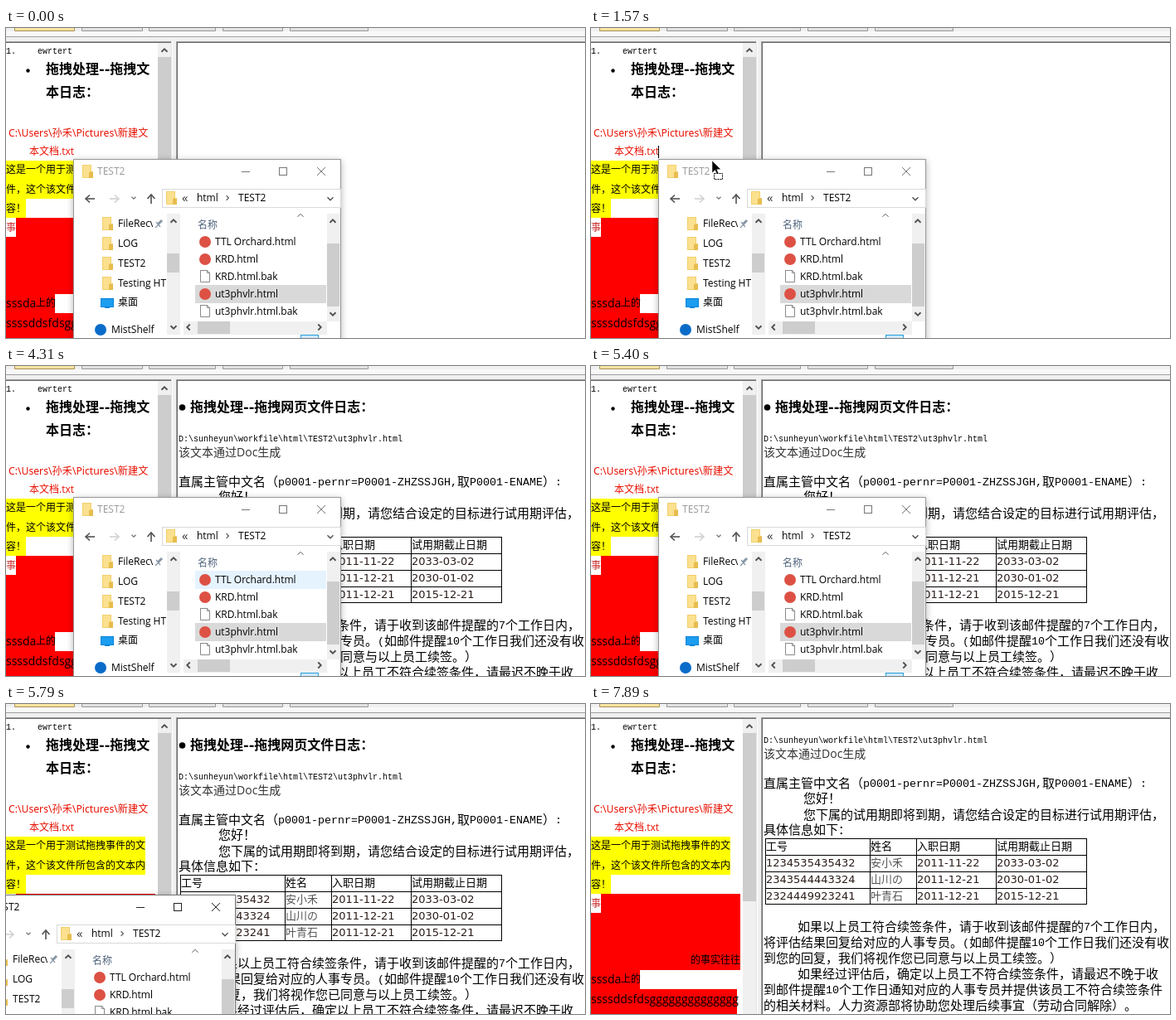
Recreate the animation shown at these times as an HTML page with a canvas. Size 698x374 px, loop 8000 ms.

```html
<!DOCTYPE html>
<html lang="zh-CN">
<head>
<meta charset="utf-8">
<style>
html, body { margin: 0; width: 100%; height: 100%; overflow: hidden; background: #fff; }
canvas { display: block; }
</style>
</head>
<body>
<canvas id="stage" width="698" height="374"></canvas>
<script>
const ctx = document.getElementById("stage").getContext("2d");
const LOOP = 8000;
const CJK = '"Noto Sans CJK SC", "Noto Sans CJK", sans-serif';
const UI = `"Open Sans", ${CJK}`;
const WIDE_UI = `"Noto Sans", ${CJK}`;
const CELL = `"DejaVu Sans", ${CJK}`;
const MONO = '"Liberation Mono", monospace';

function rect(x, y, w, h, fill) {
  ctx.fillStyle = fill;
  ctx.fillRect(x, y, w, h);
}

function frame(x, y, w, h, color) {
  ctx.strokeStyle = color;
  ctx.lineWidth = 1;
  ctx.strokeRect(x + 0.5, y + 0.5, w - 1, h - 1);
}

function line(color, width, ...points) {
  ctx.strokeStyle = color;
  ctx.lineWidth = width;
  ctx.beginPath();
  points.forEach(([x, y]) => ctx.lineTo(x, y));
  ctx.stroke();
}

function shape(fill, ...points) {
  ctx.fillStyle = fill;
  ctx.beginPath();
  points.forEach(([x, y]) => ctx.lineTo(x, y));
  ctx.closePath();
  ctx.fill();
}

function disc(x, y, r, fill) {
  ctx.fillStyle = fill;
  ctx.beginPath();
  ctx.arc(x, y, r, 0, Math.PI * 2);
  ctx.fill();
}

// y is the vertical middle of the line of text
function text(str, x, y, size = 12, family = UI, color = "#000", weight = "") {
  ctx.font = `${weight} ${size}px ${family}`;
  ctx.fillStyle = color;
  ctx.fillText(str, x, y + size * 0.37);
}

// Fixed-pitch text: full-width cells of 15px, Latin runs at 8px per letter
function gridText(str, x, y) {
  for (const run of str.match(/[ -~]+|[^ -~]/g)) {
    const latin = run < "\x7f";
    if (latin) text(run, x, y, 13.33, MONO);
    else text(run, x, y, 15, CJK);
    x += latin ? run.length * 8 : 15;
  }
}

function clipped(x, y, w, h, draw) {
  ctx.save();
  ctx.beginPath();
  ctx.rect(x, y, w, h);
  ctx.clip();
  draw();
  ctx.restore();
}

// dir: 0 up, 1 right, 2 down, 3 left
function chevron(x, y, dir, color = "#505050", r = 3.5, width = 1.8) {
  ctx.save();
  ctx.translate(x, y);
  ctx.rotate(dir * Math.PI / 2);
  line(color, width, [-r, r / 2], [0, -r / 2], [r, r / 2]);
  ctx.restore();
}

function arrow(x, y, dir, color) {
  ctx.save();
  ctx.translate(x, y);
  ctx.rotate(dir * Math.PI / 2);
  line(color, 1.6, [0, 6], [0, -5]);
  line(color, 1.6, [-4.5, 0], [0, -5], [4.5, 0]);
  ctx.restore();
}

function folder(x, y) {
  rect(x, y, 11, 16, "#f3cf6b");
  rect(x + 1, y + 1, 9, 14, "#fbe08f");
  shape("#e8bd4e", [x + 8, y + 9], [x + 13, y + 8], [x + 13, y + 16], [x + 8, y + 16]);
}

function page(x, y) {
  shape("#fff", [x, y], [x + 8, y], [x + 12, y + 4], [x + 12, y + 15], [x, y + 15]);
  line("#8a8a8a", 1, [x + .5, y + .5], [x + 8.5, y + .5], [x + 11.5, y + 3.5],
    [x + 11.5, y + 14.5], [x + .5, y + 14.5], [x + .5, y]);
  line("#8a8a8a", 1, [x + 8.5, y], [x + 8.5, y + 3.5], [x + 12, y + 3.5]);
}

// Held steps between keyed poses [time, x, y]
const STEP = 77.5;
function poseAt(keys, t) {
  const start = keys[0][0];
  const at = start + Math.floor((t - start) / STEP + 0.02) * STEP;
  let i = 0;
  while (i < keys.length - 2 && at >= keys[i + 1][0]) i++;
  const [t0, x0, y0] = keys[i], [t1, x1, y1] = keys[i + 1];
  const p = Math.max(0, Math.min(1, (at - t0) / (t1 - t0)));
  return [Math.round(x0 + (x1 - x0) * p), Math.round(y0 + (y1 - y0) * p)];
}

function drawToolbar() {
  rect(0, 0, 698, 374, "#f0f0f0");
  rect(0, 4, 698, 6, "#f8f8f8");
  [[10, 73], [91, 74], [172, 81], [261, 73], [342, 95]].forEach(([x, w], i) => {
    rect(x, 0, w, 4, i ? "#e1e1e1" : "#fbe3a1");
    line(i ? "#9a9a9a" : "#a8925a", 1, [x + .5, 0], [x + .5, 3.5], [x + w - .5, 3.5], [x + w - .5, 0]);
  });
  rect(0, 10, 698, 1, "#a0a0a0");
}

function drawLeft(caret) {
  rect(0, 16, 200, 358, "#fff");
  rect(0, 16, 200, 1, "#a0a0a0");
  rect(0, 17, 200, 1, "#696969");
  text("1.", 0, 27, 10, MONO);
  text("ewrtert", 38, 27, 10, MONO);
  disc(26.5, 51.5, 2.2, "#000");
  text("拖拽处理--拖拽文", 48, 49, 16, CELL, "#000", "bold");
  text("本日志：", 48, 77, 16, CELL, "#000", "bold");
  text("C:\\Users\\孙禾\\Pictures\\新建文", 3, 126, 12.2, WIDE_UI, "#e81000");
  text("本文档.txt", 28, 149, 12, UI, "#e81000");
  if (caret) rect(81, 142, 1, 15, "#000");

  rect(0, 160, 168, 46, "#ff0");
  rect(0, 206, 24, 23, "#ff0");
  text("这是一个用于测试拖拽事件的文", 0, 171, 12, CJK);
  text("件，这个该文件所包含的文本内", 0, 195, 12, CJK);
  text("容！", 0, 218, 12, CJK);

  rect(12, 229, 168, 23, "#f00");
  rect(0, 252, 180, 69, "#f00");
  rect(0, 321, 59, 23, "#f00");
  rect(0, 344, 176, 30, "#f00");
  text("事", 0, 241, 12, CJK, "#c33");
  text("的事实往往", 120, 309, 12, CJK);
  text("sssda", 0, 332, 14, UI);
  text("上的", 36, 332, 12, CJK);
  text("ssssddsfds" + "g".repeat(14), 0, 356, 14, UI);

  rect(183, 18, 16, 356, "#f0f0f0");
  rect(183, 35, 16, 203, "#cdcdcd");
  chevron(191, 27, 0);
  rect(199, 16, 1, 358, "#e3e3e3");
  rect(200, 16, 1, 358, "#fff");
}

function drawTable() {
  const cols = [210, 336, 392, 488, 597];
  const rows = [206, 226, 246, 266, 285];
  cols.forEach(x => rect(x, 206, 1, 80, "#000"));
  rows.forEach(y => rect(210, y, 388, 1, "#000"));
  const cells = [
    ["工号", "姓名", "入职日期", "试用期截止日期"],
    ["1234535435432", "安小禾", "2011-11-22", "2033-03-02"],
    ["2343544443324", "山川の", "2011-12-21", "2030-01-02"],
    ["2324449923241", "叶青石", "2011-12-21", "2015-12-21"]
  ];
  cells.forEach((row, r) => row.forEach((str, c) =>
    text(str, cols[c] + 1, rows[r] + 9, 13, CELL, r && c === 1 ? "#555" : r ? "#2b1d1a" : "#000")));
}

function drawDocument() {
  text("该文本通过Doc生成", 208, 104, 14, UI, "#333");
  gridText("直属主管中文名（p0001-pernr=P0001-ZHZSSJGH,取P0001-ENAME）:", 208, 139);
  gridText("您好！", 256, 157);
  gridText("您下属的试用期即将到期，请您结合设定的目标进行试用期评估，", 256, 177);
  gridText("具体信息如下：", 208, 195);
  drawTable();
  gridText("如果以上员工符合续签条件，请于收到该邮件提醒的7个工作日内，", 249, 312);
  gridText("将评估结果回复给对应的人事专员。(如邮件提醒10个工作日我们还没有收", 208, 331);
  gridText("到您的回复，我们将视作您已同意与以上员工续签。）", 208, 350);
  gridText("如果经过评估后，确定以上员工不符合续签条件，请最迟不晚于收", 249, 369);
  gridText("到邮件提醒10个工作日通知对应的人事专员并提供该员工不符合续签条件", 208, 388);
  gridText("的相关材料。人力资源部将协助您处理后续事宜（劳动合同解除）。", 208, 407);
}

function drawRight(t) {
  rect(205, 16, 493, 358, "#fff");
  rect(205, 16, 493, 1, "#a0a0a0");
  rect(205, 17, 493, 1, "#696969");
  rect(205, 16, 1, 358, "#a0a0a0");
  rect(206, 17, 1, 357, "#696969");
  if (t < 3340) return;
  clipped(207, 18, 491, 356, () => {
    if (t >= 7890) ctx.translate(0, -44);
    disc(212.5, 50, 3.8, "#000");
    text("拖拽处理--拖拽网页文件日志：", 222, 49, 16, CELL, "#000", "bold");
    text("D:\\sunheyun\\workfile\\html\\TEST2\\ut3phvlr.html", 208, 87, 10, MONO);
    if (t >= 3590) drawDocument();
  });
}

function drawTitleBar(active) {
  const ink = active ? "#000" : "#999";
  const glyph = active ? "#222" : "#777";
  folder(92, 165);
  text("TEST2", 110, 173, 12, UI, ink);
  rect(284, 173, 10, 1, glyph);
  frame(329, 168, 10, 10, glyph);
  line(glyph, 1, [375, 168], [385, 178]);
  line(glyph, 1, [385, 168], [375, 178]);
}

function drawAddressBar(hover) {
  arrow(101, 206, 3, "#505050");
  arrow(131, 206, 1, "#d0d0d0");
  chevron(154, 205, 2, "#707070", 2.5, 1.2);
  arrow(175, 206, 0, "#505050");
  frame(188, 194, 216, 23, "#d9d9d9");
  if (hover === "html") rect(226, 195, 34, 21, "#d8eafa");
  if (hover === "here") rect(276, 195, 43, 21, "#d8eafa");
  folder(193, 197);
  text("«", 212, 204, 15, UI, "#333");
  text("html", 230, 205);
  chevron(267, 205, 1, "#555", 2.8, 1.2);
  text("TEST2", 280, 205);
  chevron(391, 206, 2, "#505050", 3.5, 1.4);
}

function drawTree() {
  clipped(82, 222, 112, 180, () => {
    [["FileRecv", 236], ["LOG", 260], ["TEST2", 284], ["Testing HTML", 308]].forEach(([name, y]) => {
      folder(116, y - 8);
      text(name, 135, y);
    });
    rect(177, 226, 17, 20, "#fff");
    line("#8797a8", 3, [188, 232], [183, 237]);
    line("#8797a8", 1.2, [181, 234], [186, 240]);
    line("#8797a8", 1.2, [184, 237], [180, 241]);
    rect(114, 326, 16, 11, "#0a84d8");
    rect(115, 327, 14, 9, "#1b9df0");
    rect(119, 337, 6, 1, "#0a84d8");
    text("桌面", 135, 331, 12, CJK);
    disc(114, 364, 7, "#0a6cc9");
    text("MistShelf", 127, 364);
  });
  rect(194, 224, 16, 146, "#f0f0f0");
  rect(194, 272, 15, 23, "#cdcdcd");
  chevron(202, 233, 0);
  chevron(202, 361, 2);
}

function drawFiles(hover, rowFocus) {
  if (hover === "header") rect(228, 227, 158, 20, "#d9ebf9");
  if (hover === "first") rect(228, 247, 158, 22, "#e5f3ff");
  chevron(355, 226, 0, "#555", 3.5, 1);
  text("名称", 231, 238, 12, CJK, "#4c607a");
  rect(228, 310, 158, 22, rowFocus ? "#cce8ff" : "#d9d9d9");
  if (rowFocus) frame(228, 310, 158, 22, "#99d1ff");
  const names = ["TTL Orchard.html", "KRD.html", "KRD.html.bak", "ut3phvlr.html", "ut3phvlr.html.bak"];
  names.forEach((name, i) => {
    const y = Math.round(257.5 + i * 21.1);
    if (name.endsWith("bak")) page(234, y - 8);
    else disc(240, y, 7, "#dd5144");
    text(name, 252, y);
  });
  rect(387, 224, 16, 130, "#f0f0f0");
  rect(387, 260, 15, 76, "#cdcdcd");
  chevron(394, 233, 0);
  chevron(394, 345, 2);
  rect(214, 354, 173, 16, "#f0f0f0");
  rect(231, 354, 39, 15, "#cdcdcd");
  chevron(220, 361, 3);
  chevron(378, 361, 1);
  rect(355, 370, 22, 20, "#cce8ff");
  frame(355, 370, 22, 20, "#26a0da");
}

function drawExplorer(x, y, active, hover, rowFocus) {
  ctx.save();
  ctx.translate(x, y);
  ctx.shadowColor = "rgba(0,0,0,.3)";
  ctx.shadowBlur = 8;
  ctx.shadowOffsetY = 2;
  rect(81, 158, 323, 240, "#fff");
  ctx.shadowColor = "transparent";
  frame(81, 158, 323, 240, active ? "#777" : "#999");
  drawTitleBar(active);
  drawAddressBar(hover);
  drawTree();
  drawFiles(hover, rowFocus);
  ctx.restore();
}

function pointer(x, y, dragging) {
  const tip = [[0, 0], [0, 15], [3.5, 11.5], [6, 17], [8, 16], [5.8, 10.8], [10.5, 10.5]]
    .map(([px, py]) => [x + px, y + py]);
  shape(dragging ? "#000" : "#fff", ...tip);
  line(dragging ? "#fff" : "#000", dragging ? 0.5 : 1, ...tip, tip[0]);
  if (!dragging) return;
  rect(x + 2, y + 15, 11, 8, "#fff");
  ctx.setLineDash([2, 1]);
  frame(x + 2, y + 15, 11, 8, "#000");
  ctx.setLineDash([]);
}

function textCursor(x, y) {
  line("#333", 1, [x + .5, y - 7], [x + .5, y + 7]);
  rect(x - 2, y - 8, 6, 1, "#333");
  rect(x - 2, y + 7, 6, 1, "#333");
}

const approach = [[250, 584, 366], [640, 422, 335], [1020, 280, 323], [1100, 281, 324]];
const drag = [[1340, 281, 324], [1572, 146, 160], [1880, 108, 110], [2110, 97, 93],
  [2180, 97, 100], [2335, 104, 121], [2490, 98, 112], [2640, 97, 112], [3260, 562, 348]];
const windowMove = [[5400, 0, 0], [5477, 7, -8], [5555, 2, -4], [5632, -32, 16],
  [5787, -127, 72], [6175, -316, 200]];

function drawCursor(t) {
  if (t >= 250 && t < 1340) {
    const [x, y] = poseAt(approach, t);
    if (x > 404) textCursor(x, y);
    else pointer(x, y, false);
  } else if (t >= 1340 && t < 3340) {
    pointer(...poseAt(drag, t), true);
  }
}

function hoverAt(t) {
  if (t < 4310 || t >= 4770) return "";
  return t < 4390 ? "first" : t < 4470 ? "header" : t < 4620 ? "html" : "here";
}

function draw(t) {
  drawToolbar();
  drawLeft(t >= 1495 && t < 1880);
  drawRight(t);
  if (t < 6250) {
    const [x, y] = t < 5400 ? [0, 0] : poseAt(windowMove, t);
    drawExplorer(x, y, t >= 5470, hoverAt(t), t >= 940 && t < 1418);
  }
  drawCursor(t);
}

function tick() {
  draw(performance.now() % LOOP);
  requestAnimationFrame(tick);
}
tick();
</script>
</body>
</html>
```
